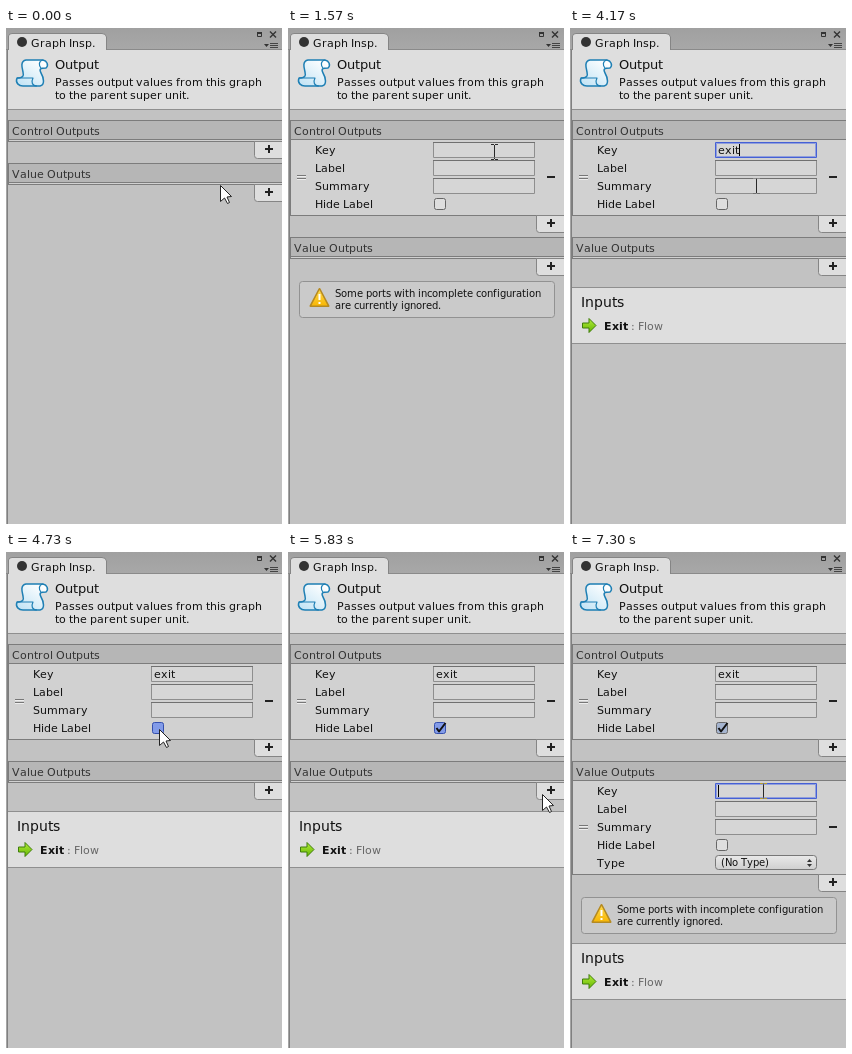
An HTML page with a canvas that plays this animation: 276x496 px, repeating every 8 s.

```html
<!DOCTYPE html>
<html lang="en">
<head>
<meta charset="utf-8">
<title>Graph inspector</title>
<style>
html, body { margin: 0; width: 276px; height: 496px; overflow: hidden; background: #c2c2c2; }
canvas { display: block; }
</style>
</head>
<body>
<canvas id="stage" width="276" height="496"></canvas>
<script>
const ctx = document.getElementById('stage').getContext('2d');
const LOOP = 8000;

// Pointer keys: time, x, y
const PATH = [
  [0, 214, 157], [700, 258, 121], [1267, 258, 121], [1450, 226, 122], [1670, 198, 124],
  [3900, 198, 124], [4170, 186, 157], [4480, 158, 184], [4730, 153, 177],
  [5000, 153, 177], [5270, 171, 227], [5560, 226, 243], [5830, 254, 242], [6000, 261, 240],
  [6567, 261, 240], [7030, 193, 238], [LOOP, 193, 238]
];

function tangent(i, k) {
  const a = PATH[i - 1], b = PATH[i], c = PATH[i + 1];
  if (!a || !c || (b[k] - a[k]) * (c[k] - b[k]) <= 0) return 0;
  return (c[k] - a[k]) / (c[0] - a[0]);
}

function pointer(t) {
  let i = 0;
  while (i < PATH.length - 2 && t >= PATH[i + 1][0]) i++;
  const a = PATH[i], b = PATH[i + 1], d = b[0] - a[0], u = (t - a[0]) / d;
  const at = k => {
    const h = u * u * (3 - 2 * u);
    return Math.round(a[k] + (b[k] - a[k]) * h
      + d * (tangent(i, k) * u * (1 - u) ** 2 - tangent(i + 1, k) * u * u * (1 - u)));
  };
  return [at(1), at(2)];
}

function rect(x, y, w, h, color) {
  ctx.fillStyle = color;
  ctx.fillRect(x, y, w, h);
}

function ramp(x, y, w, h, from, to) {
  const g = ctx.createLinearGradient(0, y, 0, y + h);
  g.addColorStop(0, from);
  g.addColorStop(1, to);
  rect(x, y, w, h, g);
}

// Letters advance by whole pixels, as in a hinted interface font
function text(str, x, y, size = 11, color = '#111', weight = 'normal') {
  ctx.font = `${weight} ${size}px "DejaVu Sans", Verdana, sans-serif`;
  ctx.fillStyle = color;
  for (const ch of str) {
    ctx.fillText(ch, x, y);
    x += Math.round(ctx.measureText(ch).width);
  }
  return x;
}

function shape(points, fill, stroke, width = 1) {
  ctx.beginPath();
  for (let i = 0; i < points.length; i += 2) ctx.lineTo(points[i], points[i + 1]);
  ctx.closePath();
  paint(fill, stroke, width);
}

function box(x, y, w, h, r, fill, stroke) {
  ctx.beginPath();
  ctx.roundRect(x + .5, y + .5, w - 1, h - 1, r);
  paint(fill, stroke);
}

function paint(fill, stroke, width = 1) {
  if (fill) { ctx.fillStyle = fill; ctx.fill(); }
  if (stroke) { ctx.strokeStyle = stroke; ctx.lineWidth = width; ctx.stroke(); }
}

function scrollIcon() {
  const blue = '#1e7fb4';
  ctx.lineJoin = 'round';
  const g = ctx.createLinearGradient(34, 32, 16, 58);
  g.addColorStop(0, '#ffffff');
  g.addColorStop(1, '#c3e4f5');
  ctx.beginPath();
  ctx.moveTo(37, 32);
  ctx.lineTo(20, 32);
  ctx.bezierCurveTo(14, 33, 16, 40, 17, 44);
  ctx.bezierCurveTo(18, 48, 17, 50, 11, 50);
  ctx.bezierCurveTo(9, 55, 13, 58, 17, 58);
  ctx.lineTo(34, 58);
  ctx.bezierCurveTo(39, 57, 38, 50, 35, 45);
  ctx.bezierCurveTo(33, 41, 34, 40, 40, 40);
  ctx.bezierCurveTo(43, 37, 41, 33, 37, 32);
  ctx.closePath();
  paint(g, blue, 1.5);
  ctx.beginPath();
  ctx.moveTo(37, 32);
  ctx.bezierCurveTo(32, 33, 33, 38, 35, 40);
  ctx.moveTo(11, 50);
  ctx.lineTo(27, 50);
  ctx.bezierCurveTo(25, 54, 26, 58, 31, 58);
  paint(null, blue, 1.2);
}

function windowFrame() {
  rect(0, 0, 276, 496, '#c2c2c2');
  ramp(0, 0, 276, 22, '#a0a0a0', '#a8a8a8');
  rect(0, 21, 276, 1, '#8a8a8a');
  ctx.beginPath();
  ctx.moveTo(2.5, 22);
  ctx.lineTo(2.5, 8);
  ctx.quadraticCurveTo(3, 5.5, 6, 5.5);
  ctx.lineTo(96, 5.5);
  ctx.quadraticCurveTo(100, 5.5, 100.5, 9);
  ctx.lineTo(100.5, 22);
  paint('#dedede', '#858585');
  ctx.beginPath();
  ctx.arc(16, 14, 5, 0, 7);
  paint('#333');
  text('Graph Insp.', 25, 19);

  ctx.strokeStyle = '#333';
  ctx.lineWidth = 1;
  ctx.strokeRect(251.5, 4.5, 4, 4);
  rect(251, 4, 5, 2, '#333');
  ctx.beginPath();
  ctx.moveTo(264, 3.5); ctx.lineTo(270, 9.5);
  ctx.moveTo(270, 3.5); ctx.lineTo(264, 9.5);
  paint(null, '#333', 1.4);
  shape([258, 16, 263, 16, 260.5, 19], '#333');
  for (let y = 15; y < 20; y += 2) rect(264, y, 8, 1, '#444');

  rect(2, 22, 274, 59, '#dedede');
  rect(2, 81, 274, 1, '#8f8f8f');
  scrollIcon();
  text('Output', 49, 41, 13);
  text('Passes output values from this graph', 49, 58);
  text('to the parent super unit.', 49, 71);
  rect(0, 22, 1, 474, '#a5a5a5');
  rect(1, 22, 1, 474, '#808080');
}

function field(y, focus, value) {
  box(145, y, 102, 16, 0, '#d6d6d6', focus ? '#4560d6' : '#8e8e8e');
  if (focus) {
    ctx.strokeStyle = 'rgba(90,115,225,.55)';
    ctx.strokeRect(146.5, y + 1.5, 99, 13);
  } else rect(145, y, 102, 1, '#707070');
  const end = value ? text(value, 148, y + 12) : 148;
  if (focus) rect(end, y + 2, 1, 12, '#000');
}

function checkbox(y, focus, checked) {
  const fill = focus ? '#829be8' : checked ? '#a5b4cf' : '#dedede';
  box(146, y, 12, 12, 2, fill, focus ? '#344fae' : '#666');
  if (!checked) return;
  ctx.beginPath();
  ctx.moveTo(148.5, y + 6);
  ctx.lineTo(151, y + 9.5);
  ctx.lineTo(157.5, y + 1);
  paint(null, '#111', 2);
}

function plusButton(y, down) {
  ctx.beginPath();
  ctx.roundRect(248.5, y + .5, 32, 17, [0, 0, 0, 3]);
  paint(down ? '#111' : '#dedede', down ? '#111' : '#858585');
  const ink = down ? '#fff' : '#222';
  rect(259, y + 7, 8, 2, ink);
  rect(262, y + 4, 2, 8, ink);
}

// Draws one list and returns the y of its lower edge
function list(title, top, rows, state) {
  const end = top + (rows ? rows * 18 + 23 : 21);
  const edge = '#7c7c7c';
  rect(2, top, 274, 1, edge);
  rect(2, top + 1, 274, 18, '#b6b6b6');
  text(title, 6, top + 15, 11, '#333');
  rect(2, top + 19, 274, 1, edge);
  rect(2, top + 20, 274, end - top - 20, '#d1d1d1');
  if (rows) {
    const y = top + 22, mid = Math.floor((top + 20 + end) / 2);
    ['Key', 'Label', 'Summary', 'Hide Label', 'Type'].slice(0, rows)
      .forEach((s, i) => text(s, 27, y + 12 + i * 18));
    field(y, state.focus, state.key);
    field(y + 18);
    field(y + 36);
    checkbox(y + 56, state.boxFocus, state.checked);
    if (rows > 4) typeMenu(y + 72);
    for (const d of [-2, 1]) {
      rect(9, mid + d, 9, 1, '#777');
      rect(9, mid + d + 1, 9, 1, '#eee');
    }
    rect(259, mid - 1, 8, 2, '#222');
  }
  rect(2, top, 1, end - top, edge);
  rect(2, end, 247, 1, edge);
  plusButton(end, state.down);
  return end;
}

function typeMenu(y) {
  const g = ctx.createLinearGradient(0, y, 0, y + 15);
  g.addColorStop(0, '#eaeaea');
  g.addColorStop(1, '#cecece');
  box(145, y, 102, 15, 3, g, '#777');
  text('(No Type)', 151, y + 11, 10);
  shape([237, y + 7, 242, y + 7, 239.5, y + 4], '#333');
  shape([237, y + 9, 242, y + 9, 239.5, y + 12], '#333');
}

function warning(y) {
  box(11, y, 256, 37, 3, '#cacaca', '#929292');
  const g = ctx.createLinearGradient(0, y + 7, 0, y + 26);
  g.addColorStop(0, '#ffdc50');
  g.addColorStop(1, '#f7b400');
  ctx.lineJoin = 'round';
  shape([31.5, y + 8, 40.5, y + 25, 22.5, y + 25], g, '#b58a22', 2);
  shape([31.5, y + 9, 39.5, y + 24.5, 23.5, y + 24.5], g);
  rect(30.5, y + 13, 2, 6, '#fff');
  rect(30.5, y + 21, 2, 2, '#fff');
  text('Some ports with incomplete configuration', 47, y + 16, 10);
  text('are currently ignored.', 47, y + 28, 10);
}

function inputs(y, key) {
  rect(2, y, 274, 1, '#8f8f8f');
  rect(2, y + 1, 274, 55, '#dedede');
  rect(2, y + 56, 274, 1, '#8f8f8f');
  text('Inputs', 11, y + 20, 14);
  const g = ctx.createLinearGradient(0, y + 31, 0, y + 46);
  g.addColorStop(0, '#b5ee3c');
  g.addColorStop(1, '#62b400');
  shape([12.5, y + 36, 19, y + 36, 19, y + 31.5, 26, y + 38.5, 19, y + 45.5, 19, y + 41, 12.5, y + 41], g, '#3f7d0b');
  const end = text(key[0].toUpperCase() + key.slice(1), 34, y + 43, 11, '#111', 'bold');
  text(' : Flow', end, y + 43, 11, '#666');
}

function arrow(x, y) {
  ctx.save();
  ctx.translate(x + .5, y + .5);
  ctx.lineJoin = 'miter';
  shape([0, 0, 0, 16, 4, 12.5, 7, 18, 9, 17, 6.5, 11.5, 11, 11], '#fff', '#222');
  ctx.restore();
}

// The text pointer inverts what lies below it
function beam(x, y) {
  ctx.globalCompositeOperation = 'difference';
  for (const dy of [-7, 8]) {
    rect(x - 3, y + dy, 3, 1, '#fff');
    rect(x + 1, y + dy, 3, 1, '#fff');
  }
  rect(x, y - 6, 1, 14, '#fff');
  ctx.globalCompositeOperation = 'source-over';
}

function draw(t) {
  const within = (a, b) => t >= a && t < b;
  const key = 'exit'.slice(0, [2530, 2770, 3000, 3230].filter(s => t >= s).length);
  const hasControl = t >= 1070, hasValue = t >= 6300;

  windowFrame();
  const mid = list('Control Outputs', 92, hasControl ? 4 : 0, {
    key, focus: within(1830, 4730), boxFocus: within(4730, 6170),
    checked: t >= 4870, down: within(930, 1070)
  });
  const end = list('Value Outputs', mid + 22, hasValue ? 5 : 0, {
    focus: t >= 7170, down: within(6170, 6300)
  });
  const warn = hasControl && !key || hasValue;
  if (warn) warning(end + 23);
  if (key) inputs(end + (warn ? 69 : 29), key);

  const [x, y] = pointer(t);
  const fields = [hasControl && 114, hasValue && 231].filter(Boolean);
  const overField = x >= 145 && x < 247 &&
    fields.some(f => y >= f && y < f + 52 && (y - f) % 18 < 16);
  const clicking = within(1830, 1970) || within(7170, 7300);
  (overField && !clicking ? beam : arrow)(x, y);
}

const start = performance.now();
function tick(now) {
  draw(Math.max(0, now - start) % LOOP);
  requestAnimationFrame(tick);
}
draw(0);
requestAnimationFrame(tick);
</script>
</body>
</html>
```
